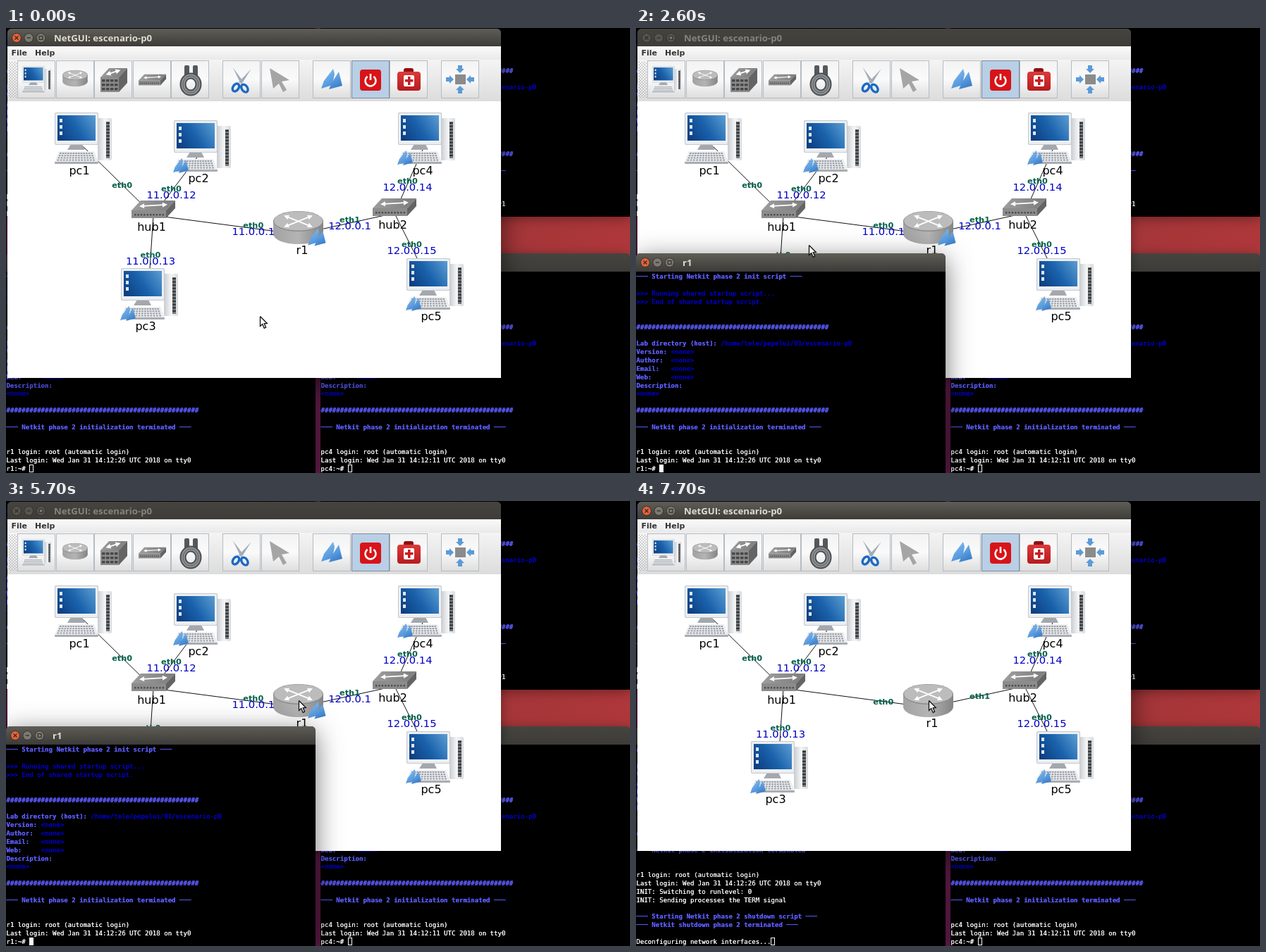
Animation, 885 px wide and 632 px high, one loop 8 s. Source, as an HTML page with a canvas:

```html
<!DOCTYPE html>
<html lang="es">
<head>
<meta charset="utf-8">
<style>
html, body { margin: 0; width: 100%; height: 100%; overflow: hidden; background: #000; }
canvas { display: block; }
</style>
</head>
<body>
<canvas id="stage" width="885" height="632"></canvas>
<script>
const ctx = document.getElementById('stage').getContext('2d');
const LOOP = 8000, ROW = 11.85;
const SANS = '"DejaVu Sans", sans-serif', MONO = '9.07px "DejaVu Sans Mono", monospace';
const TITLE = 'bold 13.2px "Open Sans", sans-serif';

// ---- drawing helpers ----
function rect(x, y, w, h, c, r = 0) {
  ctx.beginPath(); ctx.roundRect(x, y, w, h, r); ctx.fillStyle = c; ctx.fill();
}
function trace(p) {
  ctx.beginPath();
  for (let i = 0; i < p.length; i += 2) ctx.lineTo(p[i], p[i + 1]);
}
function poly(c, ...p) { trace(p); ctx.closePath(); ctx.fillStyle = c; ctx.fill(); }
function line(c, w, ...p) { trace(p); ctx.strokeStyle = c; ctx.lineWidth = w; ctx.stroke(); }
function oval(x, y, rx, ry, c, w) {
  ctx.beginPath(); ctx.ellipse(x, y, rx, ry, 0, 0, 7);
  if (w) { ctx.strokeStyle = c; ctx.lineWidth = w; ctx.stroke(); }
  else { ctx.fillStyle = c; ctx.fill(); }
}
function text(s, x, y, font, c, align = 'left') {
  ctx.font = font; ctx.fillStyle = c; ctx.textAlign = align; ctx.fillText(s, x, y);
}
function fade(x0, y0, x1, y1, ...colors) {
  const g = ctx.createLinearGradient(x0, y0, x1, y1);
  colors.forEach((c, i) => g.addColorStop(i / (colors.length - 1), c));
  return g;
}
function at(x, y, s, draw, turn = 0) {
  ctx.save(); ctx.translate(x, y); ctx.rotate(turn); ctx.scale(s, s); draw(); ctx.restore();
}

// ---- windows ----
function frame(x, y, w, h, title, focus) {
  const corners = [6, 6, 0, 0];
  ctx.save();
  ctx.shadowColor = focus ? 'rgba(0,0,0,.55)' : 'rgba(0,0,0,.35)';
  ctx.shadowBlur = focus ? 36 : 16;
  ctx.shadowOffsetY = focus ? 8 : 3;
  rect(x, y, w, h, '#3c3b37', corners);
  ctx.restore();
  rect(x, y, w, 25, fade(0, y, 0, y + 25, focus ? '#5f5d57' : '#45443f', '#3d3c38'), corners);
  for (let i = 0; i < 3; i++) at(x + 13 + i * 17.3, y + 13, 1, () => {
    const ink = '#33312d';
    oval(0, 0, 6.7, 6.7, ink);
    oval(0, 0, 5.9, 5.9, focus ? (i ? '#7b7970' : '#ec6238') : '#57554f');
    if (i == 2) { rect(-3, -3, 6, 6, ink); rect(-1.8, -1.8, 3.6, 3.6, '#7b7970'); }
    else line(ink, 1.4, -2.5, i - 1 && -2.5, 2.5, i - 1 && 2.5);
    if (!i) line(ink, 1.4, 2.5, -2.5, -2.5, 2.5);
  });
  text(title, x + 66, y + 18, TITLE, focus ? '#dfdbd2' : '#85837b');
}

// A plain string is white; a pair is [bold blue, dark blue].
const dashed = s => [`─── ${s} ───`], hashes = ['#'.repeat(50)], none = '<none>';
const boot = (host, second, tty) => [
  dashed('Starting Netkit phase 2 init script'),
  '',
  ['', '>>> Running shared startup script...'],
  ['', '>>> End of shared startup script.'],
  '', '',
  hashes,
  '',
  ['Lab directory (host):', ' /home/tele/pepelui/01/escenario-p0'],
  ...['Version:', 'Author:', 'Email:', 'Web:'].map(s => [s.padEnd(9), none]),
  ['Description:'],
  ['', none],
  '',
  hashes,
  '',
  dashed('Netkit phase 2 initialization terminated'),
  '', '',
  `${host} login: root (automatic login)`,
  `Last login: Wed Jan 31 14:12:${second} UTC 2018 on tty${tty}`,
];
const session = (host, second, tty) => [...boot(host, second, tty), host + ':~# '];
const halting = [
  ...boot('r1', 26, 0),
  'INIT: Switching to runlevel: 0',
  'INIT: Sending processes the TERM signal',
  '',
];
const halted = [
  ...halting,
  dashed('Starting Netkit phase 2 shutdown script'),
  dashed('Netkit shutdown phase 2 terminated'),
  '',
  'Deconfiguring network interfaces...',
];

function terminal(x, y, host, rows, focus) {
  frame(x, y + 320, 439, 312, host, focus);
  ctx.save();
  ctx.beginPath(); ctx.rect(x, y + 346, 439, 286); ctx.clip();
  rect(x, y + 346, 439, 286, '#000');
  let end;
  rows.forEach((row, i) => {
    const base = y + 629 - (rows.length - 1 - i) * ROW;
    const [bold, dark = '', plain = ''] = Array.isArray(row) ? row : ['', '', row];
    end = x + .5;
    for (const [s, c, weight] of [[bold, '#5c5cff', 'bold '], [dark, '#0000e0', ''], [plain, '#fff', '']]) {
      for (let pass = 0; pass < 2; pass++) text(s, end, base, weight + MONO, c); // crisper strokes
      end += ctx.measureText(s).width;
    }
  });
  end = Math.round(end);
  rect(end, y + 620, 6, 11, '#fff');
  if (!focus) rect(end + 1, y + 621, 4, 9, '#000');
  ctx.restore();
}

// ---- icons ----
function badge(x, y, s) {
  at(x, y, s, () => {
    poly(fade(0, 0, 20, 30, '#8cc4f4', '#3f86d2'), 0, 29, 4, 18, 17, 1, 19, 8, 16, 24);
    poly(fade(15, 5, 28, 30, '#7ab6ee', '#2f74c4'), 11, 30, 15, 21, 25, 5, 30, 25);
  });
}
function pc(x, y, on, s = 1) {
  at(x, y, s, () => {
    rect(61, 8, 20, 60, fade(61, 0, 81, 0, '#c9cccf', '#f4f5f6', '#d8dadc'), 2);
    rect(73, 13, 5, 52, '#74787c');
    for (let i = 0; i < 11; i++) rect(73, 14 + i * 4.6, 5, 2, '#303336');
    poly('#a4a8ad', 23, 45, 39, 45, 43, 53, 18, 53);
    rect(0, 0, 62, 46, '#c3c8ce', 2);
    rect(1, 1, 60, 44, '#eceff2', 2);
    rect(4, 4, 54, 36, fade(4, 40, 58, 4, '#0b3a7c', '#1a62ac', '#5c9dd2'));
    for (let i = 0; i < 3; i++) rect(7, 9 + i * 9, 4, 5, '#dce8f2');
    poly('#eceef0', 6, 55, 56, 55, 62, 70, 0, 70);
    rect(0, 70, 62, 3, '#a9adb2', 1);
    for (let r = 0; r < 4; r++)
      for (let i = 0; i < 13; i++) rect(7 - r * 1.2 + i * (3.7 + r * .18), 57 + r * 3.2, 2.7, 2, '#989da4');
  });
  if (on) badge(x - 1, y + 53, .73);
}
// A slab seen from above: front w by h, its top pushed back by dx, dy.
function slab(w, h, dx, dy) {
  poly(fade(0, -dy, w, 0, '#a0a0a0', '#828282'), 0, 0, dx, -dy, w + dx, -dy, w, 0);
  rect(0, 0, w, h, '#8c8c8c');
  poly('#646464', w, 0, w + dx, -dy, w + dx, h - dy, w, h);
}
function arrows(x, y, r, turn) {
  at(x, y, 1, () => {
    line('#fff', 1.8, -r, 0, r, 0);
    for (const k of [-1, 1]) poly('#fff', k * (r + 5), 0, k * (r - 2), -3.5, k * (r - 2), 3.5);
  }, turn);
}
function hub(x, y, s = 1) {
  at(x, y + 15 * s, s, () => {
    slab(49, 11, 13, 14);
    arrows(31, -7, 15, -.06);
    for (let i = 0; i < 10; i++) rect(4 + i * 4.4, 5, 2.3, 2.5, '#4c4c4c');
  });
}
function router(x, y, s = 1) {
  at(x, y, s, () => {
    const side = fade(-35, 0, 35, 0, '#a2a2a2', '#b4b4b4', '#858585');
    rect(-35.5, 0, 71, 18, side);
    oval(0, 18, 35.5, 14.5, side);
    oval(0, 0, 35.5, 14.5, '#8c8c8c');
    oval(0, -.5, 34.5, 13.5, '#bcbcbc');
    arrows(0, 0, 17, .38);
    arrows(0, 0, 17, -.38);
  });
}
function switchIcon() {
  at(134, 70, 1, () => {
    slab(26, 21, 12, 13);
    arrows(18, -7, 6, -.3);
    for (let i = 0; i < 12; i++) rect(2 + i % 4 * 6, 3 + (i >> 2) * 6, 4.5, 3.5, '#484848');
  });
}
function cableIcon() {
  for (const x of [253, 265]) rect(x, 53, 7, 16, '#55585b', 2);
  oval(262, 80, 11, 12, '#4d5053', 9);
  oval(262, 80, 11, 12, '#8d9194', 5);
  oval(262, 80, 11, 12, '#5b5e61', 1);
}
function scissorsIcon() {
  for (const k of [-1, 1]) at(333, 76, 1, () => {
    poly('#a3acb6', -2, 3, 3, 1, 2, -23);
    oval(-1, 11, 4, 6, '#1c69c4', 3.4);
  }, k * .6);
}
function powerIcon() {
  rect(502, 59, 30, 30, '#d81418', 4);
  ctx.beginPath(); ctx.arc(517, 75, 7.5, -.95, Math.PI + .95);
  ctx.strokeStyle = '#fff'; ctx.lineWidth = 2.6; ctx.stroke();
  line('#fff', 2.6, 517, 65, 517, 74);
}
function rescueIcon() {
  rect(564, 57, 14, 9, '#8f1014', 3);
  rect(555, 62, 33, 27, fade(0, 62, 0, 89, '#dc3a3a', '#b81a1e'), 4);
  rect(564, 67, 15, 16, '#fff', 2);
  rect(570, 69, 3.5, 12, '#c91c20');
  rect(566, 73, 11.5, 3.5, '#c91c20');
}
function centerIcon() {
  rect(637, 66, 15, 14, '#8b8b8b');
  for (let i = 0; i < 4; i++) at(644, 73, 1, () => {
    rect(-3, -20, 6, 6, '#5b9bd8');
    poly('#5b9bd8', -6, -15, 6, -15, 0, -9);
  }, i * Math.PI / 2);
}

function toolbar() {
  rect(2, 26, 700, 19, fade(0, 26, 0, 45, '#fafafa', '#e9e9e9'));
  rect(2, 45, 700, 59, fade(0, 45, 0, 104, '#f4f4f4', '#dcdcdc'));
  text('File', 7.5, 39, 'bold 11px ' + SANS, '#333');
  text('Help', 41, 39, 'bold 11px ' + SANS, '#333');
  for (let i = 0; i < 78; i++) rect(4 + i % 3 * 4 + (i / 3 & 1) * 2, 48 + (i / 3 | 0) * 2, 1, 1, '#9a9a9a');
  for (const [x0, n] of [[16, 5], [307, 2], [435, 3], [617, 1]])
    for (let i = 0; i < n; i++) {
      const x = Math.round(x0 + i * 54.6), on = x0 == 435 && i == 1;
      rect(x, 46, 54, 54, on ? '#7a8a99' : '#b4bcc4');
      rect(x + 1, 47, 52, 52, on ? '#b8cfe5' : fade(0, 47, 0, 99, '#f3f3f3', '#fafafa', '#dedede'));
    }
  pc(23, 54, false, .51);
  router(98, 67, .5);
  switchIcon();
  hub(188, 65, .63);
  cableIcon();
  scissorsIcon();
  poly('#a5a5a5', 374, 57, 402, 74, 391, 76, 398, 88, 393, 91, 387, 79, 379, 86);
  badge(447, 57, 1);
  powerIcon();
  rescueIcon();
  centerIcon();
}

// ---- network ----
const kinds = { // anchor of the cables and of the name, from the icon's corner
  pc: { port: [38, 46], label: [35, 87.5] },
  hub: { port: [31, 22], label: [28.5, 44] },
  r: { port: [0, 18.5], label: [5.5, 46.5] },
};
const nodes = {
  pc1: [69, 120], pc2: [238, 131, '11.0.0.12'], pc3: [163, 341, '11.0.0.13'],
  pc4: [556, 120, '12.0.0.14'], pc5: [568, 327, '12.0.0.15'],
  hub1: [178, 244], hub2: [520, 241], r1: [414.5, 274.5],
};
const links = [ // from, to, place of the label along the cable
  ['pc1', 'hub1', .565], ['pc2', 'hub1', .62], ['pc3', 'hub1', .5], ['pc4', 'hub2', .57], ['pc5', 'hub2', .555],
  ['r1', 'hub1', .31, '11.0.0.1'], ['r1', 'hub2', .535, '12.0.0.1'],
];
const kind = id => id.slice(0, -1);
function spot(id, what) {
  const [dx, dy] = kinds[kind(id)][what];
  return [nodes[id][0] + dx, nodes[id][1] + dy];
}
function network(routerOn) {
  for (const [a, b] of links) line('#111', 1, ...spot(a, 'port'), ...spot(b, 'port'));
  for (const [id, [x, y, ip]] of Object.entries(nodes)) {
    if (kind(id) == 'pc') pc(x, y, ip);
    if (kind(id) == 'hub') hub(x, y);
    if (kind(id) == 'r') { router(x, y); if (routerOn) badge(428, 284, .85); }
    text(id, ...spot(id, 'label'), '16px ' + SANS, '#000', 'center');
  }
  for (const [a, b, f, routerIp] of links) {
    const [x0, y0] = spot(a, 'port'), [x1, y1] = spot(b, 'port');
    const x = x0 + (x1 - x0) * f, y = y0 + (y1 - y0) * f + 4.5;
    const ip = routerIp ? routerOn && routerIp : nodes[a][2];
    text(a == 'r1' && b == 'hub2' ? 'eth1' : 'eth0', x, ip ? y - 5 : y, 'bold 11.3px ' + SANS, '#00604a', 'center');
    if (ip) text(ip, x, y + 5, '14.7px ' + SANS, '#0000c8', 'center');
  }
}

function mainWindow(focus, routerOn) {
  frame(2, 1, 700, 496, 'NetGUI: escenario-p0', focus);
  toolbar();
  rect(2, 104, 700, 393, '#fff');
  network(routerOn);
}

// ---- pointer: from ms, to ms, x, y, sideways bend ----
const moves = [
  [300, 1300, 326, 530, -62], [1700, 2300, 269, 336, 0], [2400, 3100, 146, 196, 0],
  [3800, 4100, 144, 204, 0], [4400, 5300, 434, 292, 0], [5600, 5700, 415, 283, 0],
];
function pointer(t, raised) {
  const now = Math.floor(t / 100) * 100;
  let x = 360, y = 409;
  for (const [t0, t1, x1, y1, bend] of moves) {
    const f = Math.min(1, Math.max(0, (now - t0) / (t1 - t0)));
    const e = f * f * (3 - 2 * f);
    x += (x1 - x) * e + bend * 4 * f * (1 - f);
    y += (y1 - y) * e;
  }
  const typing = x < 439 && y > (raised ? 345 : 497);
  at(Math.round(x), Math.round(y), 1, () => {
    if (typing) for (const [c, w] of [['#000', 3], ['#ddd', 1.2]]) {
      line(c, w, .5, -6, .5, 6);
      for (const end of [-6, 6]) line(c, w, -2.5, end, 3.5, end);
    } else {
      const p = [.5, .5, .5, 14.5, 3.7, 11.6, 6.2, 17.3, 8.6, 16.2, 6.2, 10.8, 10.3, 10.5, .5, .5];
      poly('#fff', ...p);
      line('#111', 1.3, ...p);
    }
  });
}

function draw(t) {
  const raised = t >= 1400 && t < 6300, down = t >= 6600;
  const rows = t >= 7700 ? halted : down ? halting : session('r1', 26, 0);
  rect(0, 0, 885, 632, fade(0, 0, 885, 0, '#4d123c', '#5c1848', '#661c4c', '#a23538', '#ae373a'));
  terminal(0, -364, 'pc3', session('pc3', 19, 1));
  terminal(446, -364, 'pc2', session('pc2', 15, 1));
  terminal(446, 0, 'pc4', session('pc4', 11, 0));
  if (!raised) terminal(0, 0, 'r1', rows, false);
  mainWindow(!raised, !down);
  if (raised) terminal(0, 0, 'r1', rows, true);
  pointer(t, raised);
}

const begin = performance.now();
function tick() {
  draw((performance.now() - begin) % LOOP);
  requestAnimationFrame(tick);
}
tick();
</script>
</body>
</html>
```
